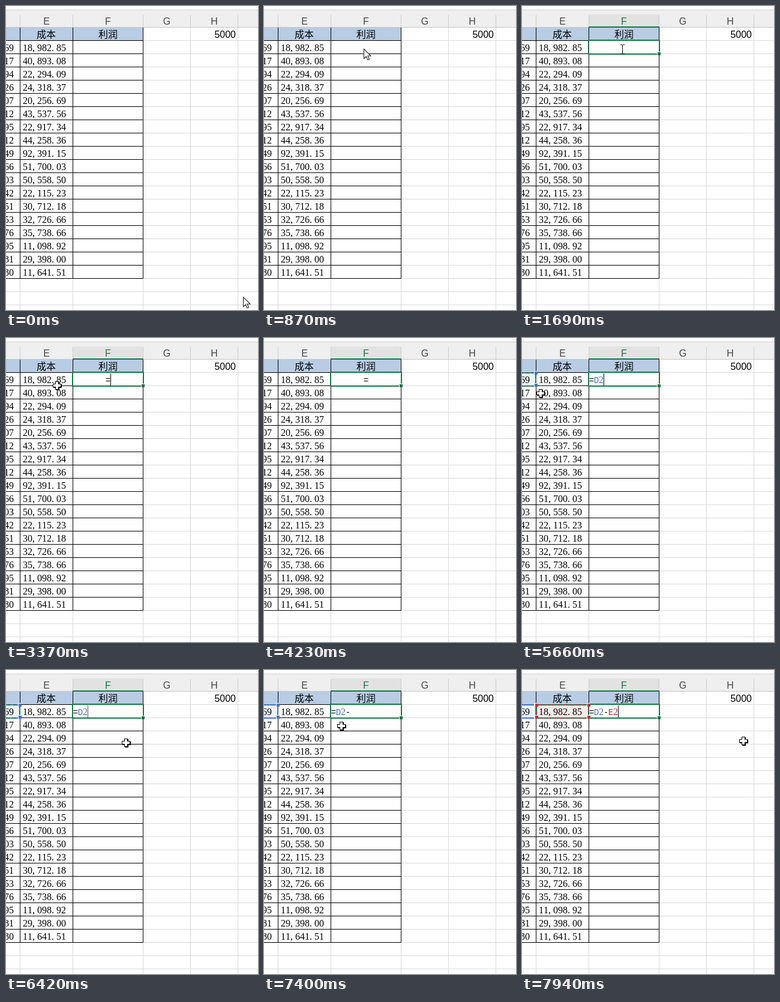
An HTML page with a canvas that plays this animation: 420 by 506 pixels, repeating every 8 s.

```html
<!DOCTYPE html>
<html lang="zh">
<head>
<meta charset="utf-8">
<style>
html, body { margin: 0; width: 100%; height: 100%; overflow: hidden; background: #fff; }
canvas { display: block; }
</style>
</head>
<body>
<canvas width="420" height="506">
69 18,982.85
17 40,893.08
94 22,294.09
26 24,318.37
07 20,256.69
12 43,537.56
95 22,917.34
12 44,258.36
49 92,391.15
66 51,700.03
03 50,558.50
42 22,115.23
51 30,712.18
53 32,726.66
76 35,738.66
95 11,098.92
81 29,398.00
80 11,641.51
</canvas>
<script>
const canvas = document.querySelector('canvas');
const ctx = canvas.getContext('2d');
const rows = canvas.textContent.trim().split('\n').map(line => line.split(' '));

const LOOP = 8000, ROW = 22, TOP = 35, BOTTOM = TOP + ROW * (rows.length + 1);
const GREEN = '#1a7543', BLUE = '#3f73c8', RED = '#c42b3c', GRID = '#dadada';
const DIGITS = '16px "Liberation Serif", serif';
const MONO = '14px "Liberation Mono", monospace';
const SANS = '16px "Liberation Sans", Arial, sans-serif';
const CJK = '300 16px "Noto Sans CJK SC", "Noto Sans CJK", sans-serif';
const columns = { E: 23, F: 111, G: 228, H: 307, I: 386 };

// Event times in ms
const SELECT = 950, EDIT = 1230, EQUALS = 2660, REAPPEAR = 3190;
const PICK_D = 5310, MINUS = 6460, PICK_E = 7740;

// Pointer stops: arrival time, x, y, optional travel time
const stops = [
  [0, 395, 484], [670, 167, 78, 630], [870, 166, 71], [1200, 168, 72],
  [REAPPEAR, 150, 91], [3370, 85, 79], [3490, 65, 71], [3890, 0, 60], [4030, -20, 60],
  [5110, 8, 67], [5520, 25, 91], [6320, 200, 121, 740], [7540, 72, 71], [7920, 369, 118, 180]
];

const clamp = v => Math.max(0, Math.min(1, v));
const smooth = v => v * v * (3 - 2 * v);

function pointerAt(t) {
  let [x, y] = stops[0].slice(1);
  let left = 0;
  for (const [at, toX, toY, travel = 300] of stops.slice(1)) {
    const k = smooth(clamp(1 - (at - t) / Math.min(travel, at - left)));
    x += (toX - x) * k;
    y += (toY - y) * k;
    left = at;
  }
  return [Math.round(x), Math.round(y)];
}

function box(color, x, y, w, h) {
  ctx.fillStyle = color;
  ctx.fillRect(x, y, w, h);
}

function text(str, x, y, font, color, align = 'center') {
  ctx.font = font;
  ctx.fillStyle = color;
  ctx.textAlign = align;
  ctx.fillText(str, x, y);
}

// Half-width glyphs on an 8px pitch, punctuation set to the left
function mono(str, x, y, color = '#000') {
  [...str].forEach((c, i) => {
    const font = /[\d,.]/.test(c) ? DIGITS : MONO;
    text(c, x + 8 * i + (/[,.]/.test(c) ? 2 : 4), y, font, color);
  });
}

function drawSheet(t) {
  const selected = t >= SELECT;
  box('#fff', 0, 0, 420, 506);
  box('#efefef', 0, 7, 420, 28);
  box('#d0d0d0', 0, 6, 420, 1);
  if (selected) box('#e2e2e2', 112, 14, 116, 20);
  box('#c4c4c4', 0, TOP, 420, 1);
  for (const x of Object.values(columns)) {
    box('#cdcdcd', x, 15, 1, 20);
    box(GRID, x, 36, 1, 470);
  }
  for (let y = TOP + ROW; y < 506; y += ROW) box(GRID, 0, y, 420, 1);

  box('#b8cce4', 0, 36, 228, 21);
  if (t >= PICK_D) box('#eef3fb', 0, 58, 23, 21);
  if (t >= PICK_E) box('#fbeae9', 24, 58, 87, 21);
  for (let y = TOP + ROW; y <= BOTTOM; y += ROW) box('#000', 0, y, 229, 1);
  for (const name of 'EFG') box('#000', columns[name], TOP + 1, 1, BOTTOM - TOP);

  const edges = Object.entries(columns);
  edges.slice(0, -1).forEach(([name, x], i) => {
    const middle = (x + edges[i + 1][1] + 1) / 2;
    text(name, middle, 31, SANS, selected && name === 'F' ? GREEN : '#444');
  });
  text('成本', 67, 53, CJK, '#000');
  text('利润', 170, 53, CJK, '#000');
  text('5000', 383, 53, SANS, '#000', 'right');
  rows.forEach(([revenue, cost], i) => {
    const y = 75 + ROW * i;
    mono(revenue, -3, y);
    mono(cost, 28, y);
  });
}

function drawSelection() {
  box(GREEN, 111, 34, 118, 2);
  ctx.strokeStyle = GREEN;
  ctx.lineWidth = 2;
  ctx.strokeRect(111, 57, 118, 23);
  box('#fff', 225, 76, 6, 6);
  box(GREEN, 226, 77, 5, 5);
}

function drawReference(color, left, right, marching, t) {
  const outline = () => ctx.strokeRect(left, 58, right - left, 22);
  ctx.strokeStyle = color;
  ctx.lineWidth = 2;
  outline();
  if (marching) {
    ctx.strokeStyle = GREEN;
    ctx.setLineDash([6, 4]);
    ctx.lineDashOffset = -Math.floor(t / 100) * 2;
    outline();
    ctx.setLineDash([]);
  }
  for (const x of [left, right]) for (const y of [58, 78]) {
    box('#fff', x - 3, y - 3, 6, 6);
    box(color, x - 2, y - 2, 5, 5);
  }
}

function drawFormula(t) {
  let caretX = 170;
  if (t >= PICK_D) {
    mono('=', 112, 75);
    mono('D2', 120, 75, BLUE);
    caretX = 136;
    if (t >= MINUS) { mono('-', 136, 75); caretX = 144; }
    if (t >= PICK_E) { mono('E2', 144, 75, RED); caretX = 160; }
  } else if (t >= EQUALS) {
    mono('=', 166, 75);
    caretX = 174;
  }
  // Caret fades out, rests, then fades back in
  const period = 1066, phase = (t - 1550 + period) % period;
  const fade = phase < 540 ? 1 - phase / 130 : (phase - 540) / 100;
  ctx.globalAlpha = t < 1550 ? 1 : clamp(fade);
  box('#000', caretX, 59, 1, 20);
  ctx.globalAlpha = 1;
}

const arrow = new Path2D('M0 0V16L3.8 12.5L6.5 18.4L9 17.3L6.5 11.5H11.5Z');

function drawArrow(x, y) {
  ctx.save();
  ctx.translate(x + .5, y + .5);
  ctx.fillStyle = '#fff';
  ctx.strokeStyle = '#222';
  ctx.lineWidth = 1.1;
  ctx.fill(arrow);
  ctx.stroke(arrow);
  ctx.restore();
}

function plus(color, x, y, reach, half) {
  box(color, x - reach, y - half, 2 * reach, 2 * half);
  box(color, x - half, y - reach, 2 * half, 2 * reach);
}

function drawCross(x, y) {
  plus('#000', x + 1, y + 1, 7, 3);
  plus('#000', x, y, 7, 3);
  plus('#fff', x, y, 6, 2);
}

function drawBeam(x, y) {
  box('#000', x - 1, y - 7, 1, 14);
  for (const end of [y - 8, y + 7]) {
    box('#000', x - 4, end, 3, 1);
    box('#000', x, end, 3, 1);
  }
}

function drawPointer(t) {
  if (t >= EQUALS && t < REAPPEAR) return;
  const editing = t >= EDIT && t < EQUALS;
  const draw = t < SELECT ? drawArrow : editing ? drawBeam : drawCross;
  draw(...pointerAt(t));
}

const start = performance.now();

function render(now) {
  const t = Math.max(0, now - start) % LOOP;
  drawSheet(t);
  if (t >= SELECT) drawSelection();
  if (t >= PICK_D) drawReference(BLUE, -6, 23, t < MINUS, t);
  if (t >= PICK_E) drawReference(RED, 24, 111, true, t);
  if (t >= EDIT) drawFormula(t);
  drawPointer(t);
  requestAnimationFrame(render);
}
render(start);
</script>
</body>
</html>
```
